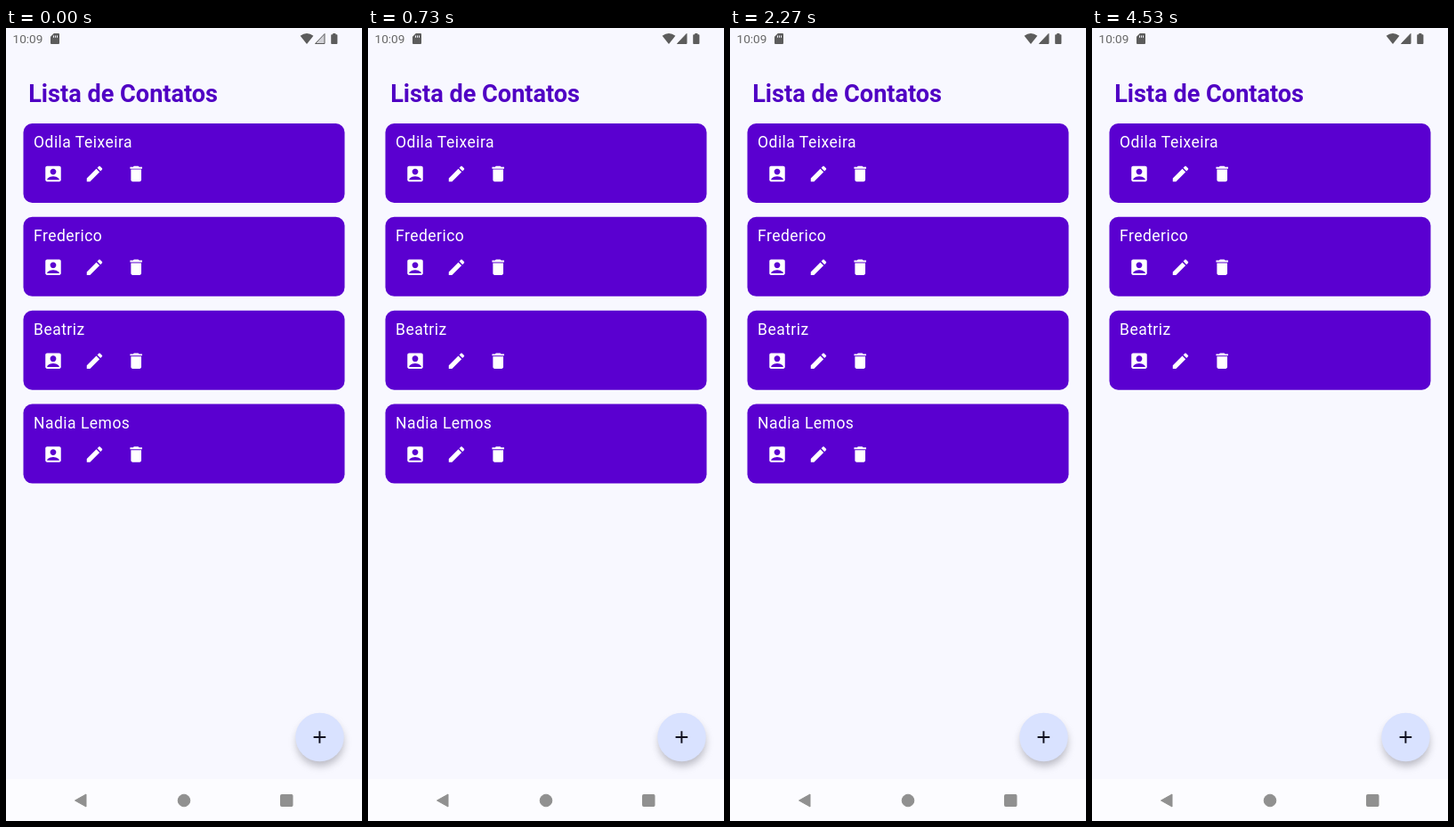
Write an HTML page that moves like this. It is 400 px wide and 889 px high and loops after 4590 ms.

```html
<!DOCTYPE html>
<html lang="pt">
<head>
<meta charset="utf-8">
<title>Lista de Contatos</title>
<style>
  html, body { margin: 0; width: 100%; height: 100%; overflow: hidden; background: #f8f8ff; }
  svg { display: block; width: 100%; height: 100%; font-family: Roboto, sans-serif; }
  .card { fill: #fff; }
  .card rect { fill: #5a00d0; }
  .card text { font-size: 17.5px; letter-spacing: .485px; }
  .title { font-size: 27.1px; font-weight: 700; fill: #5000c4; }
  .status { fill: #5c5c5c; }
  .clock { font-size: 13.6px; fill: #686868; }
  .nav { fill: #909090; stroke: #909090; stroke-linejoin: round; }
</style>
</head>
<body>
<svg viewBox="0 0 400 889">
  <defs>
    <path id="person" d="M19 3H5c-1.1 0-2 .9-2 2v14c0 1.1.9 2 2 2h14c1.1 0 2-.9 2-2V5c0-1.1-.9-2-2-2zM12 6c1.93 0 3.5 1.57 3.5 3.5S13.93 13 12 13s-3.5-1.57-3.5-3.5S10.07 6 12 6zM19 19H5v-.23c0-.62.28-1.2.76-1.58C7.47 15.82 9.64 15 12 15s4.53.82 6.24 2.19c.48.38.76.97.76 1.58V19z" fill-rule="evenodd"/>
    <path id="pencil" d="M3 17.25V21h3.75L17.81 9.94l-3.75-3.75L3 17.25zM20.71 7.04c.39-.39.39-1.02 0-1.41l-2.34-2.34c-.39-.39-1.02-.39-1.41 0l-1.83 1.83 3.75 3.75 1.83-1.83z"/>
    <path id="bin" d="M6 19c0 1.1.9 2 2 2h8c1.1 0 2-.9 2-2V7H6v12zM19 4h-3.5l-1-1h-5l-1 1H5v2h14V4z"/>
    <filter id="soft" x="-50%" y="-50%" width="200%" height="200%"><feGaussianBlur stdDeviation="4"/></filter>
  </defs>

  <g class="status">
    <text class="clock" x="7.5" y="17">10:09</text>
    <path d="M53.8 6H59q1 0 1 1V17q0 1-1 1H51q-1 0-1-1V9.8zM53 8.5v2.3h1V8.5zm2 0v2.3h1V8.5zm2 0v2.3h1V8.5z" fill-rule="evenodd"/>
    <path d="M338 18L330.6 8.8Q338 3 345.4 8.8z"/>
    <path id="signal" d="M347.5 17.5L358 6.5V17.5z" stroke="#5c5c5c"/>
    <path d="M367.2 6h3.2v1.2h1.2q.8 0 .8.8v9q0 .9-.8.9h-5.6q-.8 0-.8-.9V8q0-.8.8-.8h1.2z"/>
  </g>

  <text class="title" x="25.2" y="83">Lista de Contatos</text>
  <g id="list"></g>

  <circle cx="353" cy="801" r="26.5" fill="#80808c" opacity=".5" filter="url(#soft)"/>
  <circle cx="352.5" cy="795" r="27.2" fill="#d9e2ff"/>
  <path d="M345.6 795h13.6m-6.8-6.8v13.6" stroke="#111120" stroke-width="1.95"/>

  <rect y="842" width="400" height="47" fill="#fcfcff"/>
  <g class="nav">
    <path d="M77.5 866L90 859V873z"/>
    <circle cx="200" cy="866" r="6.8"/>
    <rect x="308.5" y="859.5" width="13.5" height="13" rx="1"/>
  </g>
</svg>
<script>
const LOOP = 4590, PRESS = 2800, REMOVE = 3130, RIPPLE_TIME = 200;
const contacts = ['Odila Teixeira', 'Frederico', 'Beatriz', 'Nadia Lemos'];
const list = document.getElementById('list');
const signal = document.getElementById('signal');

const icon = (name, x) =>
  `<use href="#${name}" transform="translate(${x - 11.65} 44.8) scale(.971)"/>`;

list.innerHTML = contacts.map((name, i) => `
  <g class="card" transform="translate(0 ${107 + i * 104.85})">
    <rect x="19.5" width="361" height="89" rx="10"/>
    <text x="31" y="27.2">${name}</text>
    ${icon('person', 53)}${icon('pencil', 99.5)}${icon('bin', 146.2)}
  </g>`).join('');

const lastCard = list.lastElementChild;
lastCard.insertAdjacentHTML('beforeend', '<circle cx="146" cy="56.5" fill="#000" opacity=".22"/>');
const ripple = lastCard.lastElementChild;

function draw() {
  const t = performance.now() % LOOP;
  const grow = Math.max(0, Math.min(1, (t - PRESS) / RIPPLE_TIME));
  ripple.setAttribute('r', 19.2 * (1 - (1 - grow) ** 2));
  lastCard.setAttribute('visibility', t < REMOVE ? 'visible' : 'hidden');
  signal.setAttribute('fill-opacity', t < 70 ? .25 : 1);
  requestAnimationFrame(draw);
}
draw();
</script>
</body>
</html>
```
